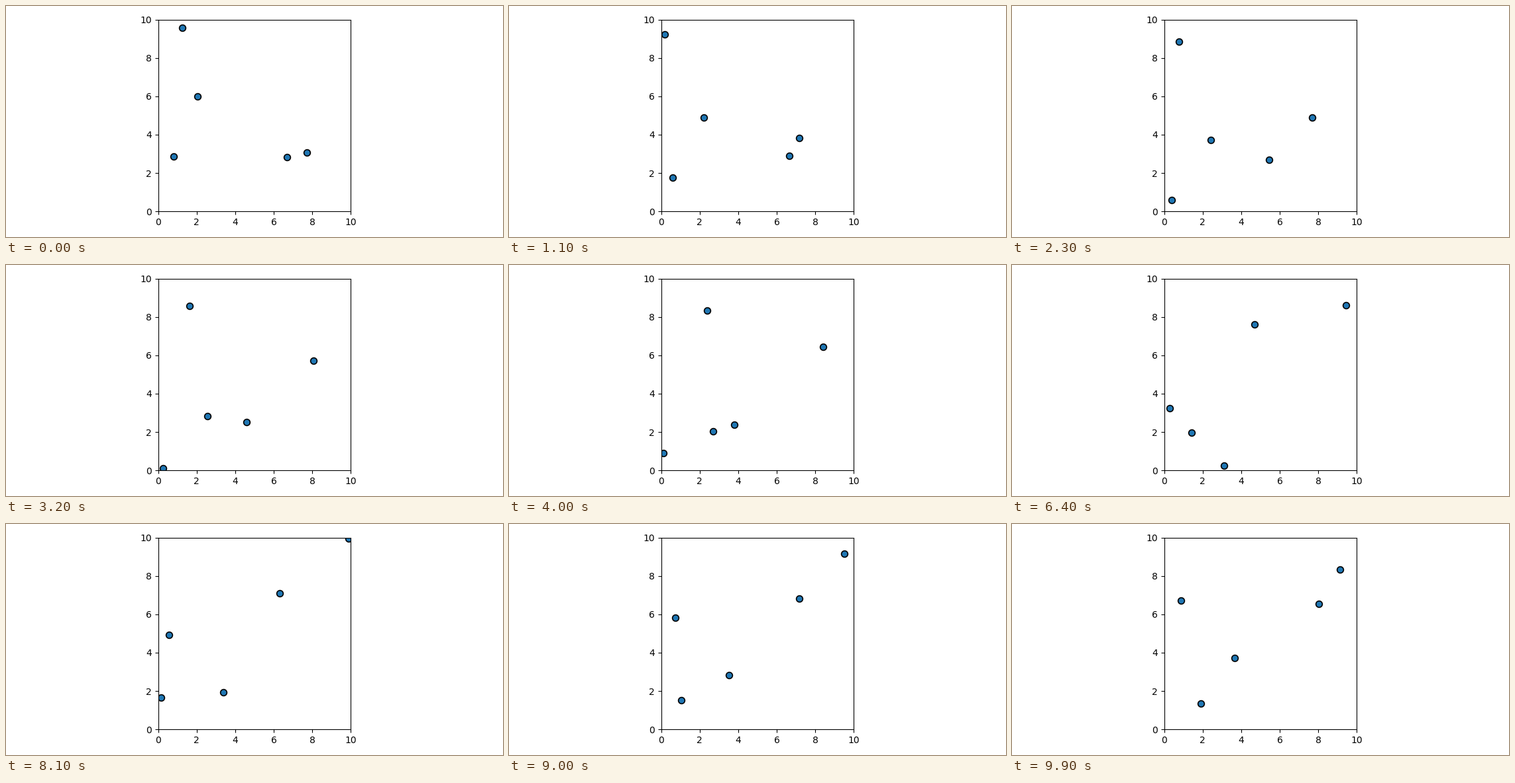
Animation, 750 px wide and 350 px high, one loop 10000 ms. Source, as a matplotlib script:

```python
import numpy as np
import matplotlib.pyplot as plt
from matplotlib.animation import FuncAnimation

FRAMES, INTERVAL = 100, 100
SIZE = 10
STEP = 0.1  # distance travelled per frame


def bounce(x, y, heading):
    """Path of one particle; a wall crossing reverses its next step."""
    angle = np.radians(heading)
    pos = np.array([x, y])
    vel = STEP * np.array([np.cos(angle), np.sin(angle)])
    path = []
    for _ in range(FRAMES):
        path.append(pos)
        vel = np.where((pos < 0) | (pos > SIZE), -vel, vel)
        pos = pos + vel
    return path


paths = np.array([
    bounce(1.25, 9.56, heading=197.74),
    bounce(2.05, 5.98, heading=279.40),
    bounce(0.80, 2.86, heading=260.16),
    bounce(6.69, 2.82, heading=64.71),
    bounce(7.725, 3.08, heading=190),
])

fig, ax = plt.subplots(figsize=(7.5, 3.5), dpi=100)
ax.set(xlim=(0, SIZE), ylim=(0, SIZE), aspect="equal",
       xticks=range(0, SIZE + 1, 2), yticks=range(0, SIZE + 1, 2))
dots, = ax.plot([], [], "o", color="C0", ms=7, mec="black", mew=1.2)
fig.tight_layout()


def update(frame):
    dots.set_data(*paths[:, frame].T)
    return dots,


anim = FuncAnimation(fig, update, frames=FRAMES, interval=INTERVAL,
                     repeat=True, repeat_delay=0)
plt.show()
```
